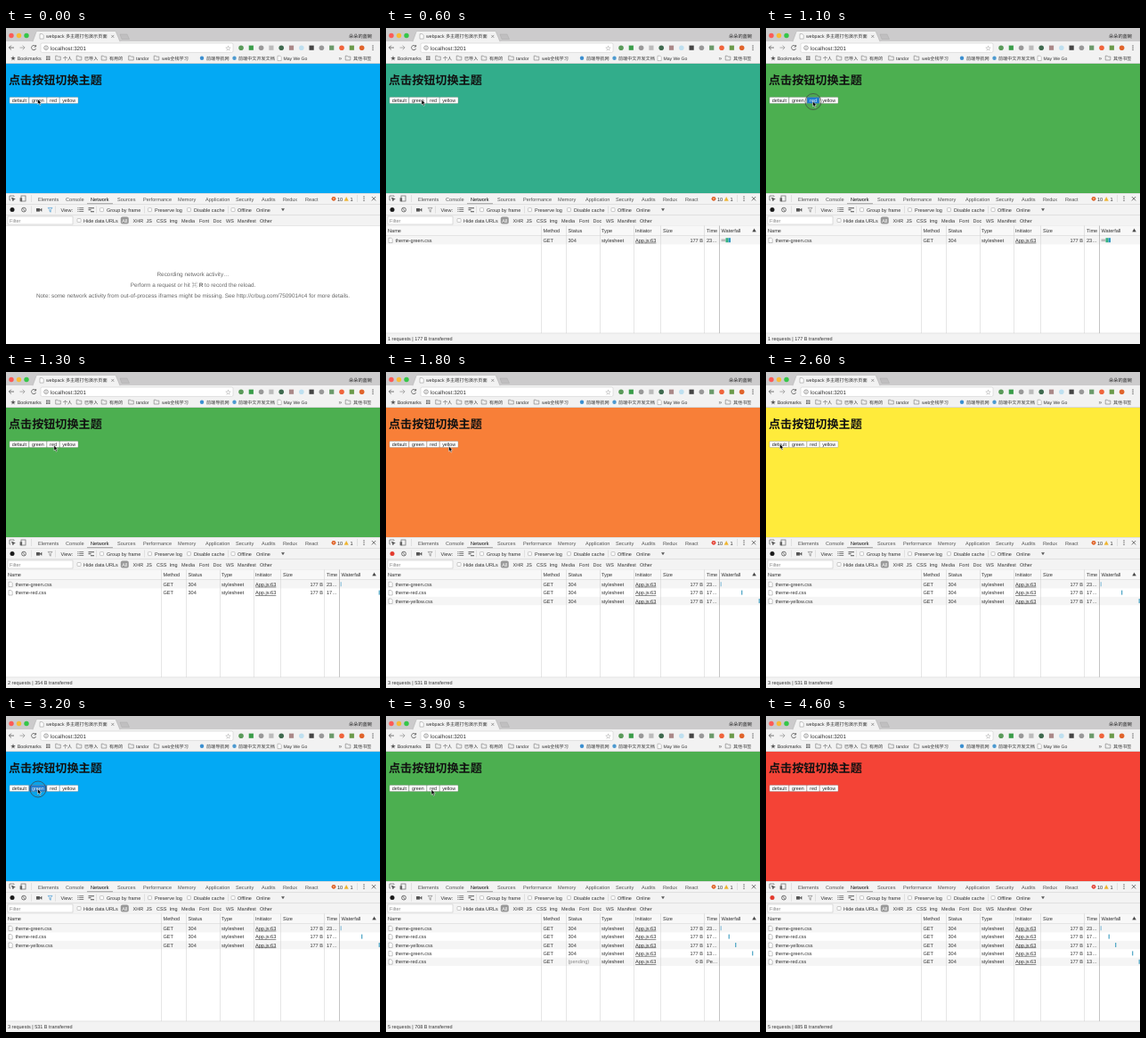
An HTML page for the animation above (4700 ms loop, 420 by 354 pixels).

```html
<!DOCTYPE html>
<html lang="zh">
<head>
<meta charset="utf-8">
<title>Theme switch</title>
<style>
html, body { margin: 0; width: 100%; height: 100%; overflow: hidden; background: #fff; }
svg { display: block; width: 420px; height: 354px; }
text {
  font-family: "Liberation Sans", "Noto Sans CJK SC", "Noto Sans CJK", sans-serif;
  text-rendering: geometricPrecision; white-space: pre;
}
</style>
</head>
<body>
<svg id="stage" viewBox="0 0 420 354"></svg>
<script>
const LOOP = 4700, STEP = 100, FADE = 500, DELAY = 100;
const stage = document.getElementById('stage');

const rect = (x, y, w, h, fill, extra = '') =>
  `<rect x="${x}" y="${y}" width="${w}" height="${h}" fill="${fill}" ${extra}/>`;
const dot = (x, y, r, fill, extra = '') =>
  `<circle cx="${x}" cy="${y}" r="${r}" fill="${fill}" ${extra}/>`;
const line = (d, color = '#666', w = 0.7, fill = 'none') =>
  `<path d="${d}" stroke="${color}" stroke-width="${w}" fill="${fill}"/>`;
const text = (x, y, s, size = 5.6, fill = '#333', extra = '') =>
  `<text x="${x}" y="${y}" font-size="${size}" fill="${fill}" ${extra}>${s}</text>`;
const END = 'text-anchor="end"', MID = 'text-anchor="middle"';
const vbar = (x, y, h, color = '#ccc') => rect(x, y, 0.5, h, color);
const box = (x, y) => rect(x - 2, y - 2, 4, 4, '#fff', 'rx=".7" stroke="#999" stroke-width=".5"');
const folder = x => line(`M${x - 2.8} 36V31.2h2l.8 .9h2.8V36z`, '#777', 0.6, '#eee');
const sheet = (x, y) => line(`M${x - 2} ${y - 2.7}h2.8l1.4 1.4v4h-4.2z`, '#888', 0.5, '#fff');

const buttons = [['default', 4, 21.7], ['green', 26, 19.8], ['red', 46, 14], ['yellow', 60.3, 20.7]];
const themes = {
  default: [3, 169, 244], green: [76, 175, 80], red: [244, 67, 54], yellow: [255, 235, 59]
};
const clicks = [
  [300, 'green'], [1200, 'red'], [1600, 'yellow'], [2550, 'default'], [3300, 'green'], [3850, 'red']
];
const requests = clicks.filter(c => c[1] !== 'default');
const times = [23, 17, 17, 13, 13], offsets = [0, 9, 16.5, 35.5, 43];
// time, x, y of the pointer tip
const path = [
  [0, 35.5, 79.5], [400, 35.5, 79.5], [1000, 52.5, 82], [1250, 52.5, 82], [1550, 70.5, 83],
  [1850, 70.5, 83], [2300, 15.5, 80.5], [2650, 15.5, 80.5], [3100, 35.5, 81.5],
  [3400, 35.5, 81.5], [3750, 51, 82.3], [4000, 51, 82.3], [4400, 430, 100], [LOOP, 430, 100]
];

function browserChrome() {
  let s = rect(0, 0, 420, 15.5, '#cccbcc') + rect(0, 15, 420, 25, '#f2f2f2');
  ['#fc5b57', '#f8bc36', '#35c649'].forEach((c, i) => s += dot(6 + i * 8.5, 8.5, 2.7, c));
  s += line('M30 15.3L34 4.2Q34.4 3.5 35.5 3.5H122Q123 3.5 123.4 4.2L128 15.3', '#aaa', 0.5, '#f2f2f2');
  s += line('M130 12.5l-2-5.5h8l2.5 5.5z', '#aaa', 0.5, '#c0bfc0');
  s += sheet(40, 9.4) + text(45, 11.4, 'webpack 多主题打包演示页面', 5.2);
  s += line('M118.3 7.9l3 3m0-3l-3 3', '#666', 0.6);
  s += text(411, 11, '朵朵的蓝碗', 5.2, '#222', END);

  s += line('M9 22H3.4m2.4-2.4L3.4 22l2.4 2.4', '#555', 0.8);
  s += line('M15.5 22h5.6m-2.4-2.4l2.4 2.4l-2.4 2.4', '#999', 0.8);
  s += line('M33.2 20.4a2.6 2.6 0 1 0 .4 2.6m0-4v2h-2', '#555', 0.8);
  s += rect(39, 17, 216, 10.4, '#fff', 'rx="1.5" stroke="#c4c4c4" stroke-width=".5"');
  s += dot(45, 22.2, 2.3, 'none', 'stroke="#666" stroke-width=".6"') + rect(44.7, 21.8, 0.6, 1.7, '#666');
  s += rect(44.7, 20.7, 0.6, 0.6, '#666') + text(50, 24.5, 'localhost:3201', 6.2, '#333');
  s += text(249.5, 24.6, '☆', 6.5, '#777', MID);
  ['#5a9a5a', '#3a9d4a', '#999', '#bbb', '#3f6a4f', '#a88', '#bfe0f0', '#444', '#999',
    '#6a9a6a', '#f0643c', '#6a9a4a', '#e0642c'].forEach((c, i) => {
    const x = 264 + i * 11.3;
    s += i % 2 ? rect(x - 2.6, 19.6, 5.2, 5.2, c) : dot(x, 22.2, 2.8, c);
  });
  [20, 22.2, 24.4].forEach(y => s += dot(412, y, 0.7, '#555'));

  s += text(5, 36, '★', 6, '#555') + text(12.7, 35.8, 'Bookmarks', 5.4);
  s += rect(45, 31.5, 4.5, 4.5, '#777') + line('M47.2 31.5v4.5M45 33.7h4.5', '#f2f2f2', 0.6);
  [[58.5, 64, '个人'], [82, 88, '已导入'], [110, 116, '有用的'], [140.5, 146, 'tandor'],
    [169, 175, 'web全栈学习'], [384, 390, '其他书签']].forEach(([x, tx, name]) =>
    s += folder(x) + text(tx, 35.8, name, 5.1));
  s += dot(220, 33.7, 2.2, '#3b8fd0') + text(225, 35.8, '前端导航网', 5.1);
  s += dot(256.5, 33.7, 2.2, '#4d9ad0') + text(261, 35.8, '前端中文开发文档', 5.1);
  s += sheet(307, 33.9) + text(311.5, 35.8, 'May We Go', 5.1) + text(373.5, 35.7, '»', 6.5, '#555');
  return s + rect(0, 39.3, 420, 0.5, '#bbb');
}

function devtools() {
  let s = rect(0, 185, 420, 169, '#fff') + rect(0, 185, 420, 36, '#f3f3f3');
  [185, 197, 209.5, 221].forEach(y => s += rect(0, y, 420, 0.5, '#ccc'));
  s += line('M9 189V188H4v5h1.2', '#666') + line('M6.3 190l4 1.6-1.7.7-.7 1.7z', '#555', 0.5, '#555');
  s += rect(17, 188, 5, 6, 'none', 'stroke="#666" stroke-width=".7"') + rect(15.6, 190.3, 2.5, 4, '#666');
  s += vbar(28, 187, 8);
  [['Elements', 36], ['Console', 67], ['Network', 95], ['Sources', 125], ['Performance', 154],
    ['Memory', 193], ['Application', 224], ['Security', 258], ['Audits', 287], ['Redux', 311],
    ['React', 336]].forEach(([name, x]) =>
    s += text(x, 193.5, name, 5.6, name === 'Network' ? '#111' : '#555'));
  s += rect(91, 196.3, 29, 0.9, '#999');
  s += text(372, 193.5, '10') + line('M380 193.6l2.2-4.2l2.2 4.2z', '#e8a317', 0.3, '#f0b429') + text(386.5, 193.5, '1');
  s += vbar(394.5, 187, 8);
  [189, 191.2, 193.4].forEach(y => s += dot(402, y, 0.65, '#555'));
  s += line('M410.8 189l4.4 4.4m0-4.4l-4.4 4.4', '#555', 0.8);

  s += dot(20, 203.6, 2.4, 'none', 'stroke="#555" stroke-width=".8"') + line('M18.4 202l3.2 3.2', '#555', 0.8);
  [28, 55.5, 101, 155, 249].forEach(x => s += vbar(x, 199.5, 8));
  s += rect(34, 202, 4, 3.6, '#555') + line('M38 203.8l2.2-1.7v3.4z', '#555', 0.3, '#555');
  s += text(61.5, 205.7, 'View:');
  [201.7, 203.6, 205.5].forEach(y => {
    s += rect(80.3, y - 0.4, 1.2, 0.8, '#666') + rect(82.2, y - 0.4, 5, 0.8, '#666');
  });
  s += rect(92.5, 201, 6.5, 1.3, '#777') + rect(92.5, 203, 3, 1.3, '#777') + rect(95, 205, 4, 1.3, '#777');
  [[107.5, 113, 'Group by frame'], [161.5, 167, 'Preserve log'], [205.5, 211, 'Disable cache'],
    [255, 260, 'Offline']].forEach(([x, tx, name]) => s += box(x, 203.6) + text(tx, 205.7, name, 5.5));
  s += text(281, 205.7, 'Online', 5.5) + line('M309.3 202.2h3.4l-1.7 2.8z', '#555', 0.2, '#555');

  s += rect(2, 211, 73, 9, '#fff', 'stroke="#bbb" stroke-width=".5"') + text(4, 217.5, 'Filter', 5.6, '#888');
  s += box(82, 215.5) + text(87, 217.5, 'Hide data URLs', 5.5);
  s += rect(128.8, 211.4, 9, 8.2, '#999', 'rx="2"') + text(133.3, 217.5, 'All', 5.5, '#fff', MID);
  [['XHR', 142.5], ['JS', 157.5], ['CSS', 169], ['Img', 183.5], ['Media', 197], ['Font', 217],
    ['Doc', 232.5], ['WS', 247], ['Manifest', 260], ['Other', 285]].forEach(([name, x]) =>
    s += text(x, 217.5, name, 5.5));
  return s;
}

function emptyLog() {
  return text(210, 278, 'Recording network activity…', 6.4, '#666', MID) +
    text(210, 290, 'Perform a request or hit <tspan font-weight="bold">⌘ R</tspan> to record the reload.', 6.4, '#666', MID) +
    text(210, 302.3, 'Note: some network activity from out-of-process iframes might be missing. ' +
      'See http://crbug.com/750901#c4 for more details.', 6.42, '#666', MID);
}

function requestLog(list, t) {
  let s = rect(0, 221.5, 420, 11, '#f8f8f8') + rect(0, 232.3, 420, 0.5, '#ccc');
  [['Name', 2], ['Method', 176.5], ['Status', 204.5], ['Type', 242], ['Initiator', 280], ['Size', 311],
    ['Time', 360], ['Waterfall', 376.5]].forEach(([name, x]) => s += text(x, 228.6, name));
  s += line('M411.5 228.3h4l-2-3.6z', '#444', 0.2, '#444');
  const scale = list.length > 1 ? 43 / offsets[list.length - 1] : 0;
  let done = 0;
  list.forEach(([at, name], i) => {
    const y = 233 + i * 9.4, base = y + 6.7, wait = t < at + DELAY;
    if (!wait) done++;
    if (i % 2 === 0) s += rect(0, y, 420, 9.4, '#f5f5f5');
    s += sheet(5, y + 4.9) + text(10.5, base, `theme-${name}.css`, 5.5) + text(176.5, base, 'GET');
    s += wait ? text(204.5, base, '(pending)', 5.6, '#888') : text(204.5, base, '304');
    s += text(242, base, 'stylesheet') + text(280, base, 'App.js:63', 5.6, '#333', 'text-decoration="underline"');
    s += text(356, base, wait ? '0 B' : '177 B', 5.6, '#333', END);
    s += text(360, base, wait ? 'Pe…' : times[i] + '…');
    if (wait) return;
    if (scale) s += rect(375.6 + offsets[i] * scale, y + 2.2, 1.2, 5, i ? '#4aa3c4' : '#8fc3dc');
    else s += rect(376.5, y + 3.4, 5, 2.8, '#bbb') + rect(381.5, y + 2.2, 3, 5, '#36b37e') + rect(384.5, y + 2.2, 2.5, 5, '#2f94c4');
  });
  [174, 202, 240, 278, 308, 357].forEach(x => s += vbar(x, 221.5, 120.5));
  s += vbar(374, 221.5, 120.5, '#888');
  return s + rect(0, 342, 420, 12, '#f3f3f3') + rect(0, 341.7, 420, 0.5, '#ccc') +
    text(2, 350.2, `${list.length} requests | ${done * 177} B transferred`, 5.5);
}

function pageColor(t) {
  let color = themes.default;
  for (const [at, name] of clicks) {
    const p = Math.min(1, Math.max(0, (t - at - DELAY) / FADE));
    const k = 1 - (1 - p) ** 2;
    color = color.map((c, i) => c + (themes[name][i] - c) * k);
  }
  return color.map(Math.round);
}

function pointer(t) {
  const i = path.findIndex(p => p[0] > t), [a, x, y] = path[i - 1], [b, u, v] = path[i];
  const p = (t - a) / (b - a), k = p * p * (3 - 2 * p);
  return [x + (u - x) * k, y + (v - y) * k];
}

function page(t) {
  const press = clicks.find(([at]) => t >= at - 100 && t < at + 50);
  let s = rect(0, 40, 420, 145, `rgb(${pageColor(t)})`);
  s += text(3, 62.8, '点击按钮切换主题', 13.1, '#111', 'font-weight="bold"');
  buttons.forEach(([name, x, w]) => {
    const down = press && press[1] === name;
    s += rect(x, 77.5, w, 7, down ? '#1c7fd8' : '#fff', 'rx=".8" stroke="#888" stroke-width=".4"');
    s += text(x + w / 2, 82.8, name, 5.4, down ? '#fff' : '#222', MID);
  });
  const [x, y] = pointer(t);
  if (press) s += dot(x + 0.5, y + 0.5, 9, 'rgba(90,90,90,.06)', 'stroke="#444" stroke-width=".7"');
  return s + line(`M${x} ${y}v6l1.4-1.2l1 2.3l1.1-.5l-1-2.2h1.8z`, '#fff', 0.5, '#000');
}

function signals(t) {
  const [r, g, b] = pageColor(t), warm = r > 200 && g < 180;
  return dot(7, 203.6, 2.5, warm ? '#e33b2e' : '#1a1a1a') +
    line('M47.2 201.4h4.8l-1.8 2.2v2.6l-1.2-.8v-1.8z', b > 200 ? '#2f8fd0' : '#777', 0.6) +
    dot(368, 191.3, 2.4, warm ? '#e33b2e' : '#dd5a1c') +
    line('M367 190.3l2 2m0-2l-2 2', '#fff', 0.5);
}

const fixed = browserChrome() + devtools();
let last = -1;
function draw(now) {
  const t = Math.floor(now % LOOP / STEP) * STEP;
  if (t !== last) {
    last = t;
    const list = requests.filter(([at]) => t >= at);
    stage.innerHTML = fixed + signals(t) + (list.length ? requestLog(list, t) : emptyLog()) + page(t);
  }
  requestAnimationFrame(draw);
}
draw(performance.now());
</script>
</body>
</html>
```
